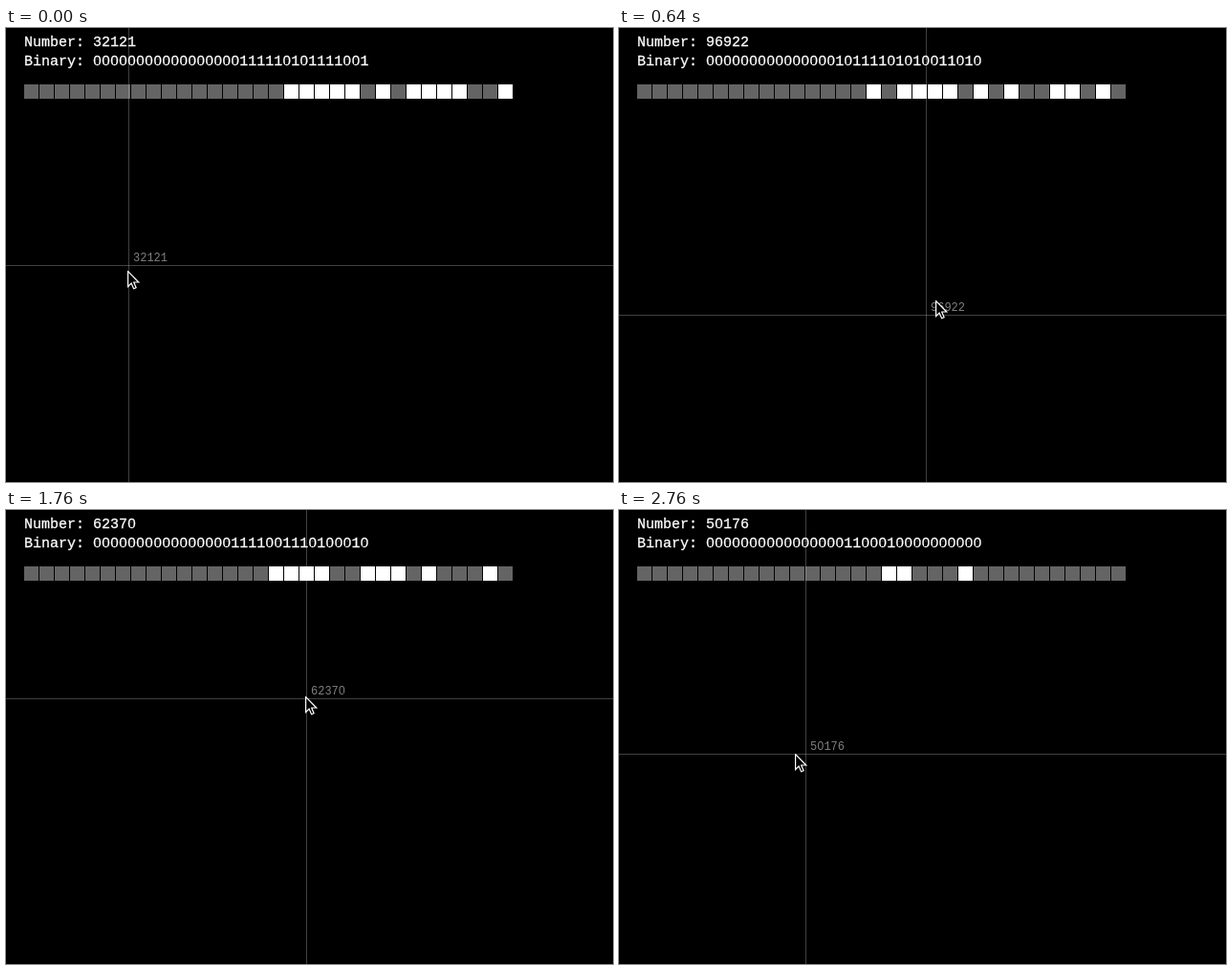
These frames come from a looping animation (635 px wide and 475 px high, 2.8 s). An HTML page:

```html
<!DOCTYPE html>
<html lang="en">
<head>
<meta charset="utf-8">
<title>Binary number</title>
<style>
html, body { margin: 0; width: 100%; height: 100%; overflow: hidden; background: #000; }
body { position: relative; font: 15px/20px "Liberation Mono", "Courier New", monospace; color: #fff; }
body > * { position: absolute; left: 0; top: 0; }
#text { left: 19px; top: 6px; white-space: pre; -webkit-text-stroke: .3px; }
#bits { left: 19px; top: 59px; display: flex; gap: 1px; }
#bits b { width: 15px; height: 15px; background: #646464; }
#bits b.on { background: #fff; }
#label { font-size: 12px; line-height: 14px; color: #808080; }
#col, #row { background: rgba(255, 255, 255, .25); }
#col { width: 1px; height: 100%; }
#row { width: 100%; height: 1px; }
/* plain zeros: hide the dot inside the digit */
i { position: relative; font-style: normal; }
i::after { content: ""; position: absolute; left: .2em; top: .42em; width: .2em; height: .3em; background: #000; }
</style>
</head>
<body>
<div id="text"><div id="number"></div><div id="binary"></div></div>
<div id="bits"></div>
<div id="label"></div>
<div id="col"></div>
<div id="row"></div>
<svg id="cursor" width="14" height="20" viewBox="0 0 14 20">
  <path d="M.6 .6V16.5L4.1 13.1 6.6 18.8 9.1 17.7 6.7 12H11.8Z" fill="#000" stroke="#fff" stroke-width="1.2"/>
</svg>
<script>
const LOOP = 2800, STEP = 54;

// key points of the hand's path: time, x, y, rest
const path = [
  [0, 128, 248], [60, 128, 257], [380, 243, 329], [430, 268, 332],
  [910, 355, 254, 130], [1260, 355, 242, 130], [1510, 348, 233, 100],
  [1760, 314, 197, 40], [2050, 273, 193, 320], [2760, 195, 255], [2810, 185, 257]
].flatMap(([t, x, y, rest]) => rest ? [[t, x, y], [t + rest, x, y]] : [[t, x, y]]);

// spans of time in which the picture updates
const spans = [[60, 580], [640, 910], [1090, 1260], [1440, 1510], [1660, 1760], [1820, 2050], [2420, 2760]];
const times = [0];
for (const [a, b] of spans) {
  const n = Math.round((b - a) / STEP);
  for (let i = 0; i <= n; i++) times.push(Math.ceil((a + i * (b - a) / n) / 10) * 10);
}

const slope = (i, k) => (path[i + 1][k] - path[i][k]) / (path[i + 1][0] - path[i][0]);

// harmonic mean of neighbouring slopes, so the curve never overshoots
function tangent(i, k) {
  if (i === 0) return slope(0, k);
  if (i === path.length - 1) return slope(i - 1, k);
  const a = slope(i - 1, k), b = slope(i, k);
  return a * b > 0 ? 2 * a * b / (a + b) : 0;
}

function at(t) {
  t = Math.min(t, path[path.length - 1][0]);
  let i = 0;
  while (i < path.length - 2 && path[i + 1][0] <= t) i++;
  const a = path[i], b = path[i + 1], d = b[0] - a[0], u = (t - a[0]) / d, v = 1 - u;
  return [1, 2].map(k => Math.round(
    a[k] * v * v * (1 + 2 * u) + b[k] * u * u * (3 - 2 * u) +
    d * u * v * (tangent(i, k) * v - tangent(i + 1, k) * u)));
}

const $ = id => document.getElementById(id);
const cells = Array.from({ length: 32 }, () => $("bits").appendChild(document.createElement("b")));
const digits = s => String(s).replace(/0/g, "<i>0</i>");
const move = (id, x, y) => { $(id).style.transform = `translate(${x}px, ${y}px)`; };

function show(t) {
  const [x, y] = at(t);
  const value = (x + 1) * (y + 1);
  const binary = value.toString(2).padStart(32, "0");

  $("number").innerHTML = "Number: " + digits(value);
  $("binary").innerHTML = "Binary: " + digits(binary);
  $("label").innerHTML = digits(value);
  cells.forEach((cell, i) => cell.classList.toggle("on", binary[i] === "1"));

  move("col", x, 0);
  move("row", 0, y);
  move("label", x + 5, y - 14);
  // the pointer runs one step ahead of the crosshair
  const [cx, cy] = at(t + STEP);
  move("cursor", cx - 1, cy - 2);
}

let shown = -1;
function tick() {
  const now = performance.now() % LOOP;
  const t = times.filter(s => s <= now).pop();
  if (t !== shown) show(shown = t);
  requestAnimationFrame(tick);
}
tick();
</script>
</body>
</html>
```
